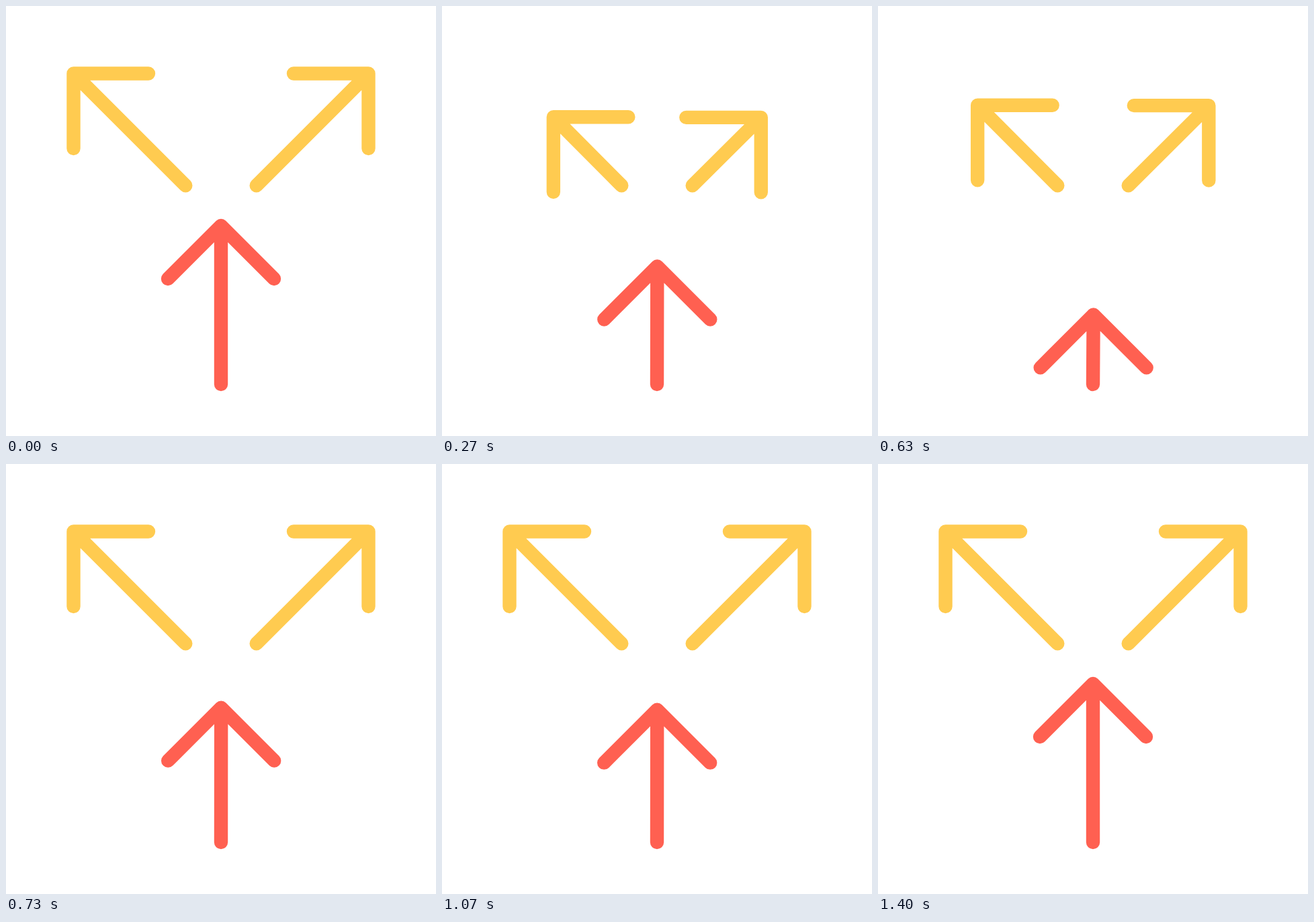
These frames come from a looping animation (640x640 px, 2 s). An HTML page:

```html
<!DOCTYPE html>
<html lang="en">
<head>
<meta charset="utf-8">
<title>Arrows</title>
<style>
  html, body { margin: 0; width: 100%; height: 100%; overflow: hidden; background: #fff; }
  svg { display: block; width: 100vw; height: 100vh; }
  path { fill: none; stroke-width: 20.4; stroke-linecap: round; stroke-linejoin: round; }
</style>
</head>
<body>
<svg viewBox="0 0 640 640">
  <g stroke="#ffcb50">
    <path id="left"/>
    <path id="right"/>
  </g>
  <path id="up" stroke="#ff6051"/>
</svg>
<script>
const LOOP = 2000;
const FPS = 30;
const DIAG = Math.SQRT1_2;
const SKEW = 0.005; // the heads drift slightly off their shafts

// [frame, pull-back along the shaft]
const KEYS = [[0, 0], [15, 168], [22, 0], [27, 107.5], [32, 0], [36, 49], [40, 0]];

// tip, direction of pull-back, the two barb offsets, fixed shaft end
const ARROWS = [
  { id: 'left', tip: [100.5, 100.5], dir: [DIAG, DIAG], barbs: [[0, 111.5], [111.5, 0]], end: [267.3, 267.3], delay: 0 },
  { id: 'right', tip: [539.5, 100.5], dir: [-DIAG, DIAG], barbs: [[0, 111.5], [-111.5, 0]], end: [372.7, 267.3], delay: 0 },
  { id: 'up', tip: [320, 327], dir: [0, 1], barbs: [[-79, 79], [79, 79]], end: [320, 563], delay: 2 }
];
for (const a of ARROWS) a.el = document.getElementById(a.id);

const ease = u => 0.84 * u * u * (3 - 2 * u) + 0.16 * u;

function pull(frame) {
  if (frame <= 0) return 0;
  for (let i = 1; i < KEYS.length; i++) {
    const [f0, v0] = KEYS[i - 1];
    const [f1, v1] = KEYS[i];
    if (frame < f1) return v0 + (v1 - v0) * ease((frame - f0) / (f1 - f0));
  }
  return 0;
}

function draw(ms) {
  const frame = Math.floor((ms % LOOP) * FPS / 1000 + 0.15);
  for (const { el, tip, dir, barbs, end, delay } of ARROWS) {
    const d = pull(frame - delay);
    const x = tip[0] + d * (dir[0] + SKEW * dir[1]);
    const y = tip[1] + d * (dir[1] - SKEW * dir[0]);
    const [a, b] = barbs.map(([bx, by]) => `${x + bx} ${y + by}`);
    el.setAttribute('d', `M${a}L${x} ${y}L${b}M${x} ${y}L${end[0]} ${end[1]}`);
  }
}

let start = null;
function tick(now) {
  if (start === null) start = now;
  draw(Math.max(0, now - start));
  requestAnimationFrame(tick);
}
draw(0);
requestAnimationFrame(tick);
</script>
</body>
</html>
```
